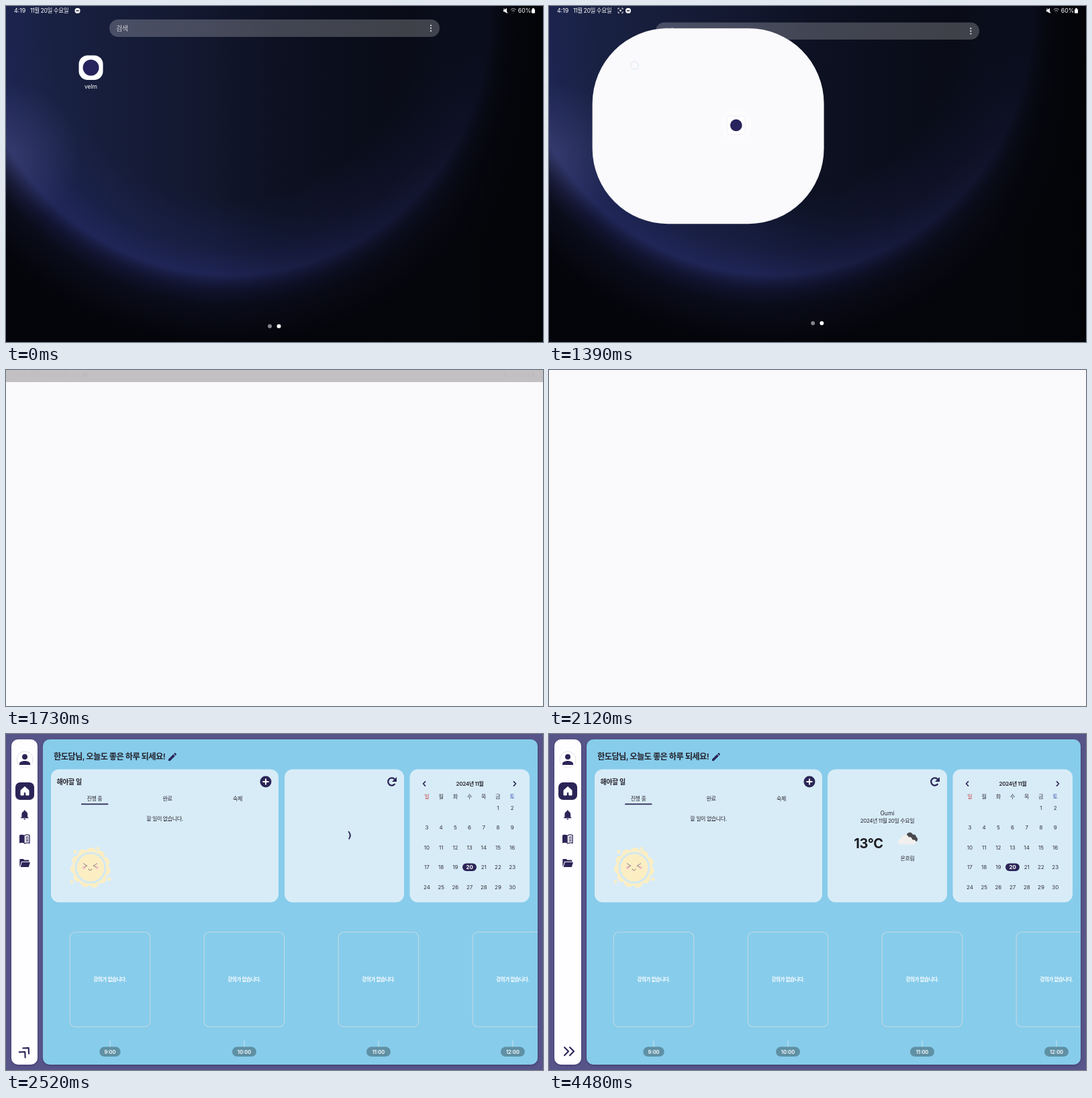
An HTML page for the animation above (4640 ms loop, 800x500 px).

```html
<!DOCTYPE html>
<html lang="ko">
<head>
<meta charset="utf-8">
<title>Tablet launch</title>
<style>
html, body { margin: 0; width: 100%; height: 100%; overflow: hidden; background: #04050a; }
body {
  background:
    linear-gradient(90deg, transparent 38%, rgba(5,6,10,.55) 82%, rgba(3,4,7,.95)),
    radial-gradient(circle at 335px 15px, transparent 385px, rgba(9,10,22,.9) 432px, #04050a 490px),
    radial-gradient(circle at 0 222px, rgba(72,78,130,.5), transparent 110px),
    radial-gradient(circle at 335px 15px, transparent 270px, rgba(30,37,88,.45) 345px, rgba(34,40,94,.8) 385px, rgba(22,26,66,.8) 410px),
    linear-gradient(90deg, #1b2449, #141a33 30%, #0e1326 50%, #0b0e1d);
}
svg { display: block; width: 100%; height: 100%; font-family: Inter, "Noto Sans CJK KR", "Noto Sans CJK", sans-serif; }
.ko { letter-spacing: -.05em; }
.mid { text-anchor: middle; }
.bold { font-weight: 600; }
.line { fill: none; stroke: #2b2557; stroke-linecap: round; stroke-linejoin: round; }
</style>
</head>
<body>
<svg viewBox="0 0 800 500">
  <defs>
    <clipPath id="windowClip"><rect id="windowRect"/></clipPath>
    <clipPath id="mainClip"><rect x="50" y="8" width="742" height="484" rx="10"/></clipPath>
    <filter id="shadow" x="-20%" y="-20%" width="140%" height="140%">
      <feDropShadow dx="0" dy="1" stdDeviation="1.5" flood-color="#1d1a40" flood-opacity=".4"/>
    </filter>
  </defs>

  <g id="home">
    <g id="launcher">
      <rect x="154" y="20" width="492" height="26" rx="13" fill="#fff" opacity=".22"/>
      <text class="ko" x="164" y="36.5" font-size="10" fill="#cbccd2">검색</text>
      <g fill="#e8e8ec"><circle cx="633" cy="29" r="1.1"/><circle cx="633" cy="33" r="1.1"/><circle cx="633" cy="37" r="1.1"/></g>
      <g id="appIcon">
        <rect x="108.5" y="73.5" width="36" height="36.5" rx="13" fill="#fff"/>
        <circle cx="126.5" cy="91.7" r="12" fill="#27235c"/>
      </g>
      <text class="mid" x="126.5" y="122.5" font-size="8.5" fill="#fff">velm</text>
      <circle cx="393" cy="476.5" r="3" fill="#85868e"/>
      <circle cx="406.5" cy="476.5" r="3" fill="#fff"/>
    </g>
    <rect id="scrim" width="800" height="500"/>
    <g id="taskbar" fill="#15172b"></g>
  </g>

  <g id="window" clip-path="url(#windowClip)">
    <rect width="800" height="500" fill="#faf9fc"/>
    <rect id="band" width="800" height="18" fill="#b1adb1"/>
    <g id="splash">
      <circle r="36" fill="#fff" opacity=".6"/>
      <rect x="-21.5" y="-21.5" width="43" height="43" rx="4" fill="#fff" stroke="#e6e4ec"/>
      <circle r="14" fill="#27235c"/>
    </g>
  </g>
  <circle id="touch" cx="127.5" cy="88.5" r="5.8" fill="none" stroke="#d6e8ee"/>

  <g id="status" font-size="8.8">
    <text x="12" y="10.3">4:19</text>
    <text class="ko" x="36" y="10.3" font-size="8.6">11월 20일 수요일</text>
    <g id="capture">
      <path d="M103 5.3v-2h2m3 0h2v2m0 3v2h-2m-3 0h-2v-2" fill="none" stroke="currentColor" stroke-width=".9"/>
      <circle id="captureDot" cx="106.5" cy="6.8" r="1.4"/>
    </g>
    <g id="quiet"><circle cy="7" r="4"/><path d="M-2.2 7h4.4" stroke="#161a30" stroke-width="1.4"/></g>
    <path d="M741 5.6h2l3-2.6v8l-3-2.6h-2z"/><path d="M741.5 3.5l6 7" stroke="currentColor" stroke-width="1"/>
    <g fill="none" stroke="currentColor" stroke-width="1" opacity=".7"><path d="M751.8 5.5q4-3.2 8 0M753.5 7.6q2.3-1.8 4.6 0"/><path d="M755.8 10v.4"/></g>
    <text x="762.8" y="10.3">60%</text>
    <rect x="783" y="4.8" width="5" height="6" rx="1"/><rect x="784.2" y="3.2" width="2.6" height="2"/>
  </g>

  <g id="dashboard" fill="#2b2557">
    <rect width="800" height="500" fill="#575489"/>
    <rect id="sidebar" x="8" y="8" height="484" rx="10" fill="#fefdff" filter="url(#shadow)"/>
    <rect id="main" y="8" height="484" rx="10" fill="#87cceb" filter="url(#shadow)"/>

    <circle cx="28" cy="38" r="12" fill="#fff" stroke="#e2e1e8"/>
    <path transform="translate(16 26)" d="M12 12a4 4 0 1 0 0-8 4 4 0 0 0 0 8zm0 2c-2.67 0-8 1.34-8 4v2h16v-2c0-2.66-5.33-4-8-4z"/>
    <rect x="14" y="72" width="28" height="26" rx="7"/>
    <path d="M28 78.5l6 5.2v7.3h-4.2v-4.3h-3.6V91H22v-7.3z" fill="#fff" stroke="#fff" stroke-linejoin="round"/>
    <path transform="translate(19 111.5) scale(.73)" d="M12 22a2 2 0 0 0 2-2h-4a2 2 0 0 0 2 2zm6-6v-5c0-3.07-1.63-5.64-4.5-6.32V4a1.5 1.5 0 0 0-3 0v.68C7.64 5.36 6 7.92 6 11v5l-2 2v1h16v-1z"/>
    <path d="M20 150.5q4-1.6 7.7.5v12q-3.7-2-7.7-.6z"/>
    <path class="line" stroke-width="1.3" d="M27.7 151q3.5-2 7.3-.5v11.8q-3.8-1.3-7.3.7M30 153.7q1.5-.5 3-.3M30 156.4q1.5-.5 3-.3M30 159.1q1.5-.5 3-.3"/>
    <path d="M20.3 197V187q0-1 1-1h4.5l1.5 1.6h6q1 0 1 1v1.2H23l-1.8 6.2z"/><path d="M23.8 190.8H36l-2.2 7.2H21.6z"/>
    <path id="chevrons" class="line" stroke-width="2.1" stroke-linecap="butt" d="M-7 -6l6 6-6 6M1 -6l6 6-6 6"/>

    <g clip-path="url(#mainClip)">
      <g id="flow">
        <text class="ko bold" x="72" y="37.8" font-size="12.3" fill="#23222c">한도담님, 오늘도 좋은 하루 되세요!</text>
        <path transform="translate(241 26) scale(.667)" d="M3 17.25V21h3.75L17.81 9.94l-3.75-3.75zM20.71 7.04a1 1 0 0 0 0-1.41l-2.34-2.34a1 1 0 0 0-1.41 0l-1.83 1.83 3.75 3.75z"/>
        <rect x="68" y="52.5" width="339" height="198" rx="12" fill="#d8ecf7"/>
        <circle cx="388" cy="71" r="8.5"/>
        <path d="M383.5 71h9M388 66.5v9" stroke="#fff" stroke-width="2"/>
        <g class="ko mid" font-size="8" fill="#26252e">
          <text class="bold" x="76.5" y="74.7" font-size="10" style="text-anchor:start">해야할 일</text>
          <text x="133" y="98.8">진행 중</text><text x="241.5" y="98.8">완료</text><text x="346" y="98.8">숙제</text>
          <text x="237.5" y="129.2">할 일이 없습니다.</text>
        </g>
        <rect x="113" y="103.4" width="40.5" height="1.9" rx=".8"/>
        <g id="sun" transform="translate(127 199)" fill="#fceec3"></g>
        <g id="lectures"></g>
      </g>
    </g>

    <rect x="415" y="52.5" width="178" height="198" rx="12" fill="#d8ecf7"/>
    <path d="M579.4 74.2a5.6 5.6 0 1 1-.4-7" fill="none" stroke="#2b2557" stroke-width="2.3"/>
    <path d="M582 64v7h-7z"/>
    <path id="spinner" class="line" stroke-width="1.9" stroke-linecap="butt"/>
    <g id="weather" class="ko mid" font-size="8" fill="#26252e">
      <text x="504" y="121" font-size="8.6" letter-spacing="0">Gumi</text>
      <text x="504" y="131.8">2024년 11월 20일 수요일</text>
      <text x="476" y="170" font-size="20" font-weight="700" fill="#1d1c22">13°C</text>
      <g fill="#48484e"><circle cx="537.5" cy="151" r="4.6"/><circle cx="543" cy="153.5" r="4"/><circle cx="545.7" cy="156.7" r="3.4"/></g>
      <g fill="#f1f0ef"><circle cx="530.5" cy="155.3" r="5.6"/><circle cx="524" cy="160" r="4.2"/><circle cx="537" cy="157.5" r="4.2"/><rect x="520" y="157.5" width="26.5" height="6.7" rx="3.3"/></g>
      <text x="534" y="187.8">온흐림</text>
    </g>

    <rect x="601.5" y="52.5" width="178.5" height="198" rx="12" fill="#d8ecf7"/>
    <path class="line" stroke-width="1.7" d="M624.5 70.8l-3 3.2 3 3.2M756.5 70.8l3 3.2-3 3.2"/>
    <text class="ko mid bold" x="691" y="77" font-size="8.1" fill="#26252e">2024년 11월</text>
    <g id="calendar" class="mid" font-size="8" fill="#33323b"></g>
  </g>
</svg>
<script>
const LOOP = 4640, LAUNCH = 1230, READY = 2330, WEATHER = 4330;
const $ = id => document.getElementById(id);
const set = (id, attrs) => { for (const k in attrs) $(id).setAttribute(k, attrs[k]); };
const show = (id, on) => { $(id).style.display = on ? '' : 'none'; };
const clamp = u => Math.min(1, Math.max(0, u));
const smooth = u => { u = clamp(u); return u * u * (3 - 2 * u); };
const mix = (a, b, p) => a + (b - a) * p;
const repeat = (n, make) => Array.from({ length: n }, (_, i) => make(i)).join('');

// Piecewise linear value over [time, value] points
function track(t, ...points) {
  let [t0, v0] = points[0];
  for (const [t1, v1] of points) {
    if (t < t1) return t1 === t0 ? v0 : mix(v0, v1, clamp((t - t0) / (t1 - t0)));
    [t0, v0] = [t1, v1];
  }
  return v0;
}

function build() {
  $('taskbar').innerHTML = repeat(9, i => `<circle cx="${305 + i * 27.5}" cy="487" r="7"/>`);

  $('sun').innerHTML = repeat(11, i => {
    const a = i * Math.PI * 2 / 11 + .2;
    return `<circle cx="${22.5 * Math.cos(a)}" cy="${22.5 * Math.sin(a)}" r="7.6"/>`;
  }) + `<circle cx="11" cy="-28.5" r="2.4"/><circle cx="-23" cy="-24" r="2.6"/><circle cx="-28" cy="21" r="2.4"/><circle cx="28" cy="17" r="2.6"/>
    <circle r="22" stroke="#d3e9f0" stroke-width="3.2"/>
    <g fill="#f3c4c6"><circle cx="-10" r="2.3"/><circle cx="9.5" r="2.3"/></g>
    <path d="M-11-6.5l6 3.8-4.5 1.6M10-6.5l-6 3.8 4.5 1.6M-3 1.5q.5 2.5 2.5 2.5t2.5-2.5" fill="none" stroke="#8d7c86" stroke-width="1"/>`;

  $('lectures').innerHTML = repeat(4, i => `<g class="mid bold" transform="translate(${156 + 200 * i} 0)" fill="#fff" font-size="7.5">
    <rect x="-59.8" y="294.7" width="119.5" height="141" rx="8" fill="none" stroke="#c3d8e2" stroke-width="1.1"/>
    <text class="ko" y="368">강의가 없습니다.</text>
    <path d="M0 456v10" stroke="#cde2ec"/>
    <rect x="${i ? -18 : -15.7}" y="465.5" width="${i ? 36 : 31.4}" height="14.6" rx="7.3" fill="#5f90a4"/>
    <text y="475.6">${9 + i}:00</text></g>`);

  const column = i => 627 + 21.2 * i;
  const weekdayColor = ['#c43c3c', , , , , , '#2c48ac'];
  $('calendar').innerHTML =
    repeat(7, i => `<text x="${column(i)}" y="95.6" fill="${weekdayColor[i] || '#33323b'}">${'일월화수목금토'[i]}</text>`) +
    '<rect x="680" y="192.4" width="21" height="11.6" rx="5.8" fill="#2b2557"/>' +
    repeat(30, i => {
      const cell = i + 5, today = i === 19;
      return `<text x="${column(cell % 7)}" y="${112.7 + 29.45 * Math.floor(cell / 7)}" ${today ? 'fill="#fff" font-weight="700"' : ''}>${i + 1}</text>`;
    });
}

function drawLaunch(t) {
  const px = smooth((Math.max(0, t - LAUNCH) / 337) ** 1.124);
  const py = smooth((Math.max(0, t - LAUNCH) / 362) ** .777);
  const left = mix(108.5, 0, px), top = mix(73.5, 0, py);
  set('windowRect', {
    x: left, y: top, width: mix(144.5, 800, px) - left, height: mix(110, 500, py) - top,
    rx: track(t, [LAUNCH, 13], [1390, 113], [1520, 30], [1590, 0])
  });
  show('window', t >= LAUNCH);
  show('appIcon', t < LAUNCH);
  show('touch', t >= 1150 && t < 1430);

  const x = track(t, [LAUNCH, 126.5], [1390, 278], [1520, 382.5], [1590, 400]);
  const y = track(t, [LAUNCH, 91.7], [1390, 177], [1520, 240], [1590, 250]);
  const scale = track(t, [LAUNCH, .5], [1390, .63], [1520, 1], [1590, 1.04]);
  set('splash', {
    transform: `translate(${x} ${y}) scale(${scale})`,
    opacity: track(t, [1400, 1], [1520, .4], [1620, 0])
  });
  set('band', { opacity: track(t, [1430, 0], [1510, 1], [1690, 1], [1850, 0]) });
  set('scrim', { opacity: track(t, [1390, 0], [1520, .55]) });
  set('taskbar', { opacity: track(t, [1420, 0], [1520, .7]) });

  const shrink = mix(1, .98, smooth((t - LAUNCH) / 150));
  set('launcher', { transform: `translate(400 250) scale(${shrink}) translate(-400 -250)` });
}

function drawStatus(t) {
  const shift = smooth((t - 120) / 330);
  const tone = Math.round(track(t, [1420, 255], [1520, 118]));
  const color = `rgb(${tone},${tone},${tone})`;
  set('status', { fill: color, color, opacity: track(t, [1560, 1], [1740, 0]) });
  set('quiet', { transform: `translate(${mix(106.5, 118, shift)} 0)` });
  set('capture', { opacity: shift });
  show('captureDot', t >= 700);
}

function drawSpinner(t) {
  const cycles = Math.max(0, (t - 2341) / 1152), turn = Math.floor(cycles), u = cycles - turn;
  const base = -73.5 + turn * 504 + 216 * u;
  const start = base + 288 * smooth(u * 2 - 1), end = base + 6 + 288 * smooth(u * 2);
  const point = deg => {
    const a = deg * Math.PI / 180;
    return `${504 + 8.6 * Math.cos(a)} ${151 + 8.6 * Math.sin(a)}`;
  };
  set('spinner', { d: `M${point(start)}A8.6 8.6 0 ${end - start > 180 ? 1 : 0} 1 ${point(end)}` });
}

function drawDashboard(t) {
  const u = clamp((t - READY) / 300);
  const p = u < .5 ? 2 * u * u : 1 - 2 * (1 - u) ** 2;
  const dx = -4 * (1 - p);
  set('sidebar', { width: 40 + dx });
  set('main', { x: 56 + dx, width: 736 - dx });
  set('flow', { transform: `translate(${dx} 0)` });
  set('chevrons', { transform: `translate(${30 + dx} 472.3) rotate(${-180 * (1 - p)})` });
  show('spinner', t < WEATHER);
  show('weather', t >= WEATHER);
  drawSpinner(t);
}

function draw(now) {
  const t = now % LOOP, ready = t >= READY;
  show('dashboard', ready);
  show('home', !ready);
  if (ready) drawDashboard(t);
  drawLaunch(t);
  drawStatus(t);
  requestAnimationFrame(draw);
}

build();
draw(performance.now());
</script>
</body>
</html>
```
